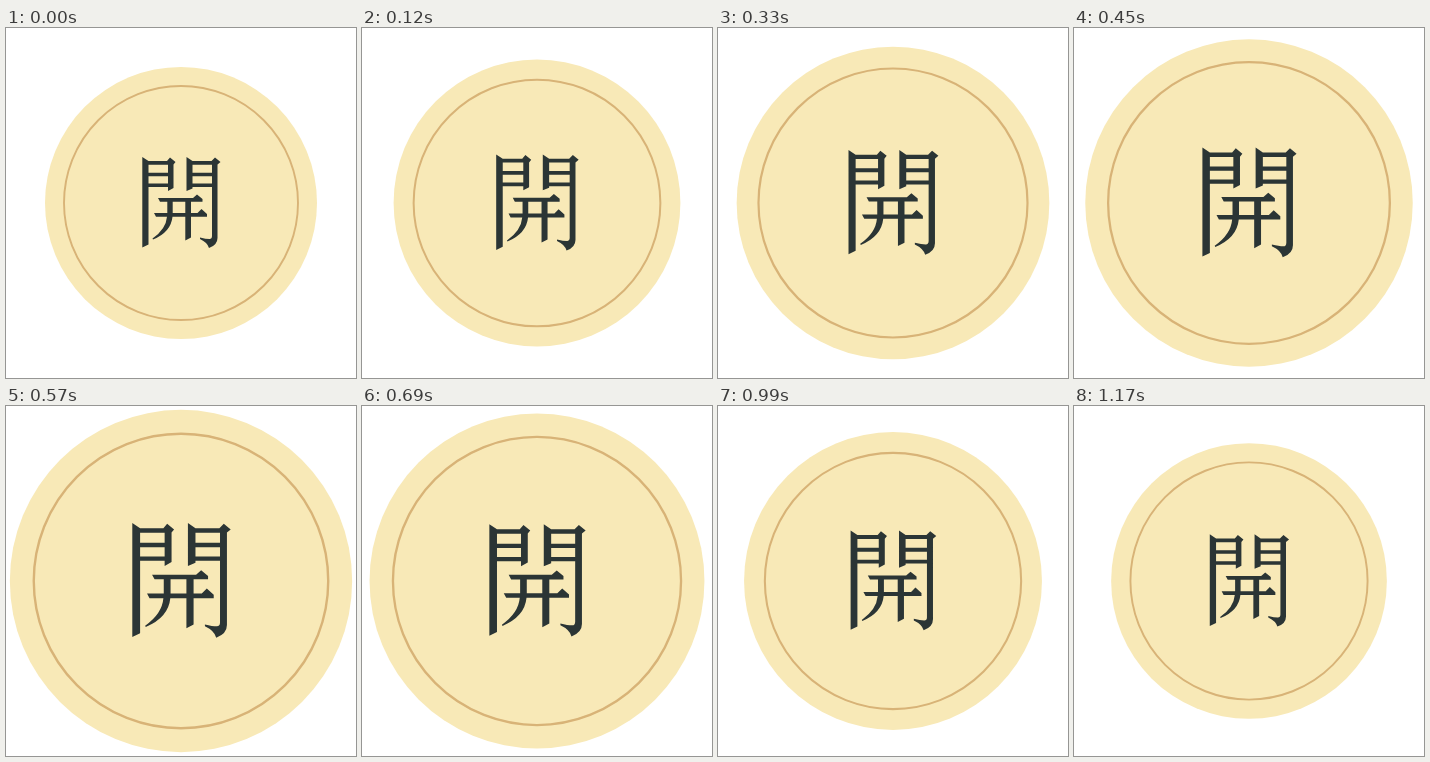
Recreate the animation shown at these times as an HTML page. Size 350x350 px, loop 1200 ms.

```html
<!DOCTYPE html>
<html lang="zh">
<head>
<meta charset="utf-8">
<title>開</title>
<style>
  html, body { margin: 0; width: 100%; height: 100%; overflow: hidden; background: #fff; }
  svg { display: block; width: 100vw; height: 100vh; }
</style>
</head>
<body>
<svg viewBox="0 0 350 350" role="img" aria-label="開">
  <g id="coin">
    <circle cx="175" cy="175" r="136" fill="#f8e9b7"/>
    <circle cx="175" cy="175" r="117" fill="none" stroke="#d8b377" stroke-width="1.9"/>
    <g fill="#2b3535" fill-rule="evenodd">
      <!-- left and right door leaves -->
      <path d="M136.300 129L142.500 133H161L164 129.500L169.500 134L167.500 136.500V160L162 163V159H142.500V216.500L136.300 219.500Z
               M142.500 136.700V144.700H162V136.700Z M142.500 148.200V155.500H162V148.200Z"/>
      <path d="M180.500 129L186.500 133H205.500L209 129.500L214.500 134L211.500 136.500V210Q211.500 217 203 220Q201.500 214.500 194 211V209.500Q200 211 203.500 211Q206 211 206 208V159H186.500V160.500L180.500 163Z
               M186.500 136.700V144.700H206V136.700Z M186.500 148.200V155.500H206V148.200Z"/>
      <!-- inner bars, sweep and stem -->
      <path d="M152 170H187L191 166.500L196.500 171V173.700H185V185H191.500L195.500 181L201 186V188.700H185V209.500L179.300 212.500V188.700H166.500Q165 204 147 211.500L146.500 210.500Q160 201 161 188.700H150L148 185H161.300V173.700H154Z
               M166.700 173.700V185H179.300V173.700Z"/>
    </g>
  </g>
</svg>
<script>
  const PERIOD = 1200, STEP = 30, GROWTH = 37 / 136;
  const coin = document.getElementById("coin");

  function draw(now) {
    const t = Math.floor((now % PERIOD) / STEP) * STEP;
    const phase = 1 - Math.abs(1 - t / (PERIOD / 2));
    coin.setAttribute("transform",
      `translate(175 175) scale(${1 + GROWTH * phase}) translate(-175 -175)`);
  }

  const start = performance.now();
  function tick() {
    draw(performance.now() - start);
    requestAnimationFrame(tick);
  }
  tick();
</script>
</body>
</html>
```
